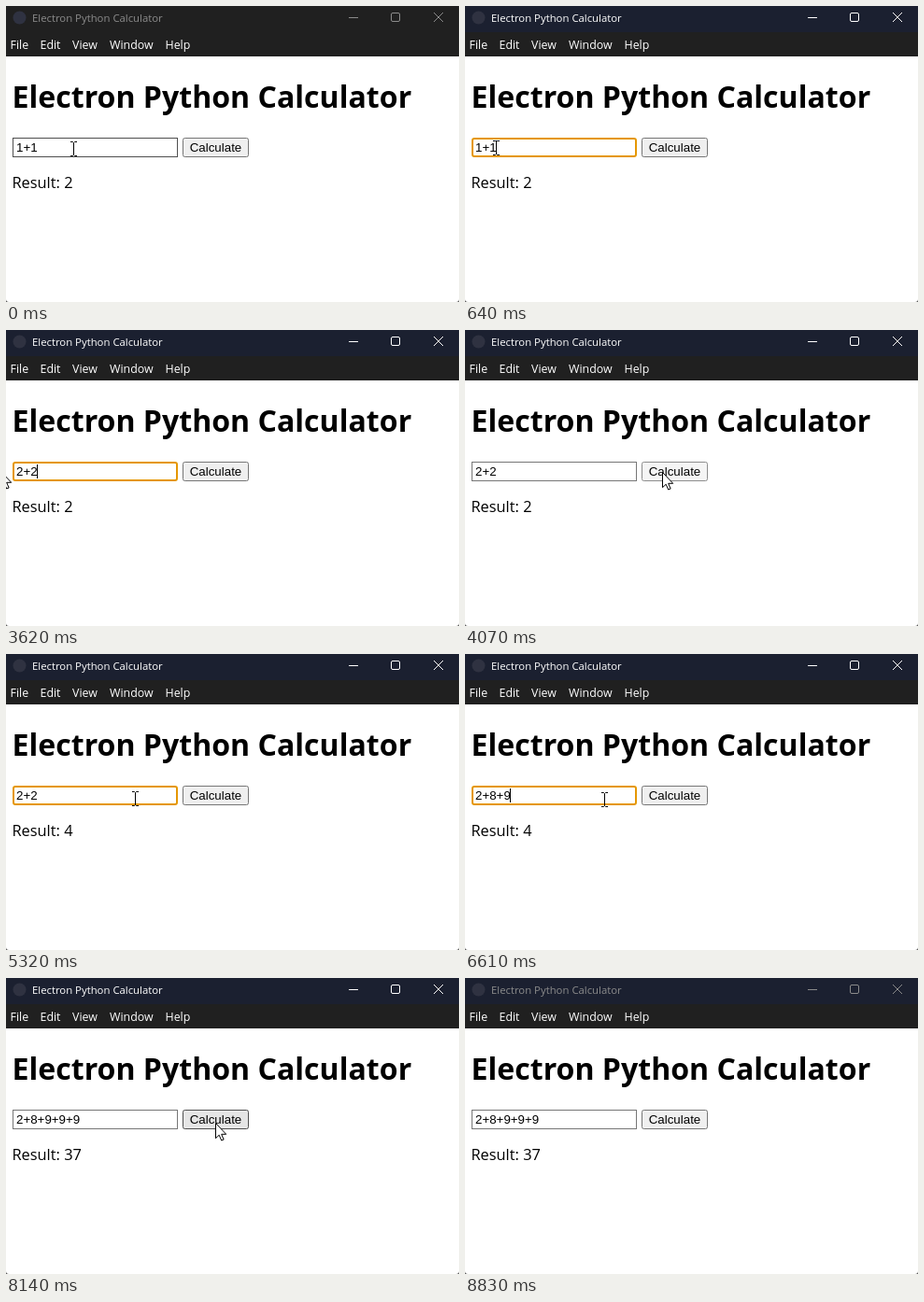
Write an HTML page that moves like this. It is 485x317 px and loops after 8.85 s.

```html
<!DOCTYPE html>
<html lang="en">
<head>
<meta charset="utf-8">
<title>Electron Python Calculator</title>
<style>
  html, body { margin: 0; width: 100%; height: 100%; overflow: hidden; background: #fff; }
  svg { display: block; width: 485px; height: 317px; }
  text { font-family: "Open Sans", "Noto Sans", sans-serif; white-space: pre; }
  .control { font: 13.333px "Liberation Sans", Arial, sans-serif; }
  .menu { font-size: 12.4px; fill: #fff; }
</style>
</head>
<body>
<svg viewBox="0 0 485 317">
  <defs>
    <clipPath id="inputClip"><rect x="10" y="143" width="171" height="17"/></clipPath>
  </defs>
  <rect width="485" height="317" fill="#4a4a4a"/>
  <path d="M0 50H485V314Q485 317 482 317H3Q0 317 0 314Z" fill="#fff"/>
  <rect y="27" width="485" height="27" fill="#202020"/>
  <rect id="titleBar" width="485" height="28"/>
  <circle cx="14.5" cy="12.5" r="7" fill="#2f3241"/>
  <text id="title" x="28" y="17" font-size="11.35">Electron Python Calculator</text>
  <g id="windowButtons" fill="none">
    <path d="M367 12.5H377"/>
    <rect x="412.5" y="7.5" width="9" height="9" rx="1.5"/>
    <path d="M458 7L468 17M468 7L458 17"/>
  </g>
  <g class="menu">
    <text x="4.5" y="46">File</text>
    <text x="36.5" y="46">Edit</text>
    <text x="71" y="46">View</text>
    <text x="111" y="46">Window</text>
    <text x="170.5" y="46">Help</text>
  </g>
  <text x="6.5" y="109" font-size="32.1" font-weight="700">Electron Python Calculator</text>

  <rect id="field" fill="#fff"/>
  <g clip-path="url(#inputClip)">
    <rect id="selection" y="144" height="15" fill="#0078d7"/>
    <text id="placeholder" class="control" x="11" y="156" fill="#757575">Enter an expression (e.g., 1 + 1)</text>
    <text class="control" x="11" y="156"><tspan id="plain"></tspan><tspan id="selected" fill="#fff"></tspan></text>
    <rect id="caret" y="144" width="1" height="15"/>
  </g>

  <rect id="button" x="189.5" y="141.5" width="70" height="20" rx="2"/>
  <text class="control" x="224.5" y="156" text-anchor="middle">Calculate</text>
  <text id="result" x="6.4" y="195" font-size="16.4"></text>

  <path id="arrow" d="M.5 .5V16.7L4.2 13.2 6.7 19 9.1 18 6.7 12.3H11.7Z" fill="#fff" stroke="#000"/>
  <path id="beam" d="M-3.5 -7.5H-1L0 -6.5 1 -7.5H3.5M0 -6.5V6.5M-3.5 7.5H-1L0 6.5 1 7.5H3.5" fill="none" stroke="#000"/>
</svg>
<script>
const LOOP = 8850;
const TEXT_X = 11;
const BLINK = 550;
const $ = id => document.getElementById(id);

// Each list holds [start time, value].
const expressions = [
  [0, '1+1'], [1910, ''], [2430, '2'], [2520, '2+2'], [5600, '2+'], [5870, '2+8'],
  ...[...'+9+9+9'].map((_, i) => [6520 + 90 * i, '2+8' + '+9+9+9'.slice(0, i + 1)])
];
const results = [[0, '2'], [4230, '4'], [7510, '37']];
const focus = [[0, false], [470, true], [4070, false], [4770, true], [7420, false]];
const pressed = [[0, false], [4070, true], [4230, false], [7420, true], [7510, false]];
const blinkStarts = [0, 470, 1700, 2430, 2520, 4770, 5600, 5870, 6520, 6970].map(t => [t, t]);

// Pointer moves: start, end, number of steps, target x, target y.
const moves = [
  [470, 790, 4, -6, 151],
  [3620, 3980, 4, 211, 152],
  [4230, 4680, 5, 138, 155],
  [5600, 5870, 3, 149, 156],
  [6970, 7240, 3, 224, 155],
  [8140, 8590, 5, 450, 330]
];

const at = (list, t) => list.reduce((value, [start, next]) => t >= start ? next : value, list[0][1]);
const ease = p => p * p * (3 - 2 * p);
const inside = (p, x0, x1) => p.x >= x0 && p.x < x1 && p.y >= 141 && p.y < 162;
const show = (id, visible) => $(id).setAttribute('visibility', visible ? 'visible' : 'hidden');

function set(id, attributes) {
  for (const name in attributes) $(id).setAttribute(name, attributes[name]);
}

function pointerAt(t) {
  let x = 72, y = 153;
  for (const [start, end, steps, toX, toY] of moves) {
    if (t < start) break;
    const step = Math.min(steps, Math.floor((t - start) * steps / (end - start) + 1e-6));
    const p = ease(step / steps);
    x += (toX - x) * p;
    y += (toY - y) * p;
  }
  return { x: Math.round(x), y: Math.round(y) };
}

const textWidth = s => [...s].reduce((w, c) => w + (c === '+' ? 7.79 : 7.415), 0);

function drawWindow(t) {
  const active = t >= 470 && t < 8830;
  set('titleBar', { fill: t < 470 ? '#202020' : '#1b2030' });
  set('title', { fill: active ? '#fff' : '#8b8b8b' });
  set('windowButtons', { stroke: active ? '#fff' : '#8b8b8b' });
}

function drawField(t, pointer, hovered) {
  const text = at(expressions, t);
  const focused = at(focus, t);
  let from = text.length;
  if (t >= 470 && t < 1910) {
    while (from > 0 && pointer.x < TEXT_X + textWidth(text.slice(0, from)) - 3.7) from--;
  }
  const hasSelection = from < text.length;
  const startX = TEXT_X + textWidth(text.slice(0, from));
  const blinkOn = (t - at(blinkStarts, t)) % (2 * BLINK) < BLINK;

  set('field', focused
    ? { x: 8, y: 142, width: 175, height: 19, rx: 2, stroke: '#e59700', 'stroke-width': 2 }
    : { x: 7.5, y: 141.5, width: 176, height: 20, rx: 0, stroke: hovered ? '#4f4f4f' : '#767676', 'stroke-width': 1 });
  set('selection', { x: startX, width: textWidth(text.slice(from)) });
  set('caret', { x: Math.floor(startX) });
  $('plain').textContent = text.slice(0, from);
  $('selected').textContent = text.slice(from);
  show('placeholder', !text);
  show('caret', focused && blinkOn && !hasSelection);
}

function drawButton(t, pointer) {
  const [fill, stroke] = at(pressed, t) ? ['#f5f5f5', '#8d8d8d']
    : inside(pointer, 189, 260) ? ['#e5e5e5', '#4f4f4f']
    : ['#efefef', '#767676'];
  set('button', { fill, stroke });
}

function draw(t) {
  const pointer = pointerAt(t);
  const overField = inside(pointer, 7, 184);
  drawWindow(t);
  drawField(t, pointer, overField);
  drawButton(t, pointer);
  $('result').textContent = 'Result: ' + at(results, t);
  set('arrow', { transform: `translate(${pointer.x} ${pointer.y})` });
  set('beam', { transform: `translate(${pointer.x + .5} ${pointer.y})` });
  show('arrow', !overField);
  show('beam', overField);
}

const began = performance.now();
function tick() {
  draw((performance.now() - began) % LOOP);
  requestAnimationFrame(tick);
}
tick();
</script>
</body>
</html>
```
